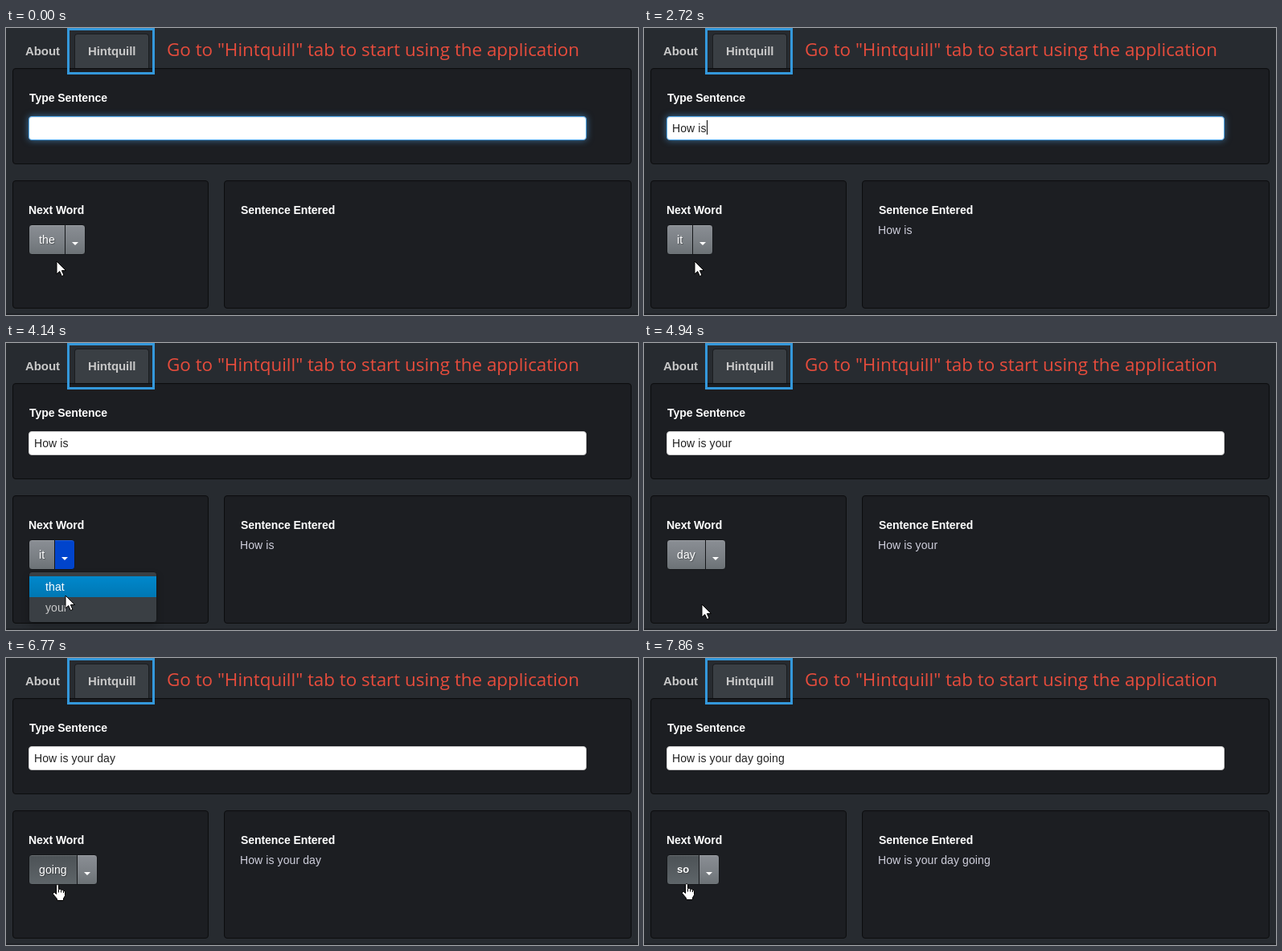
Animation, 786 px wide and 358 px high, one loop 8000 ms. Source, as an HTML page:

```html
<!DOCTYPE html>
<html lang="en">
<head>
<meta charset="utf-8">
<title>Next word prediction</title>
<style>
  html, body { margin: 0; width: 100%; height: 100%; overflow: hidden; background: #272b30; }
  body { position: relative; font: 14px/20px "Liberation Sans", Arial, sans-serif; letter-spacing: .1px; color: #c8c8c8; white-space: pre; }
  body *, svg { position: absolute; box-sizing: border-box; }
  b { color: #fff; letter-spacing: -.07px; }
  .well { background: #1c1e22; border: 1px solid #0c0d0e; border-radius: 4px; box-shadow: inset 0 1px 1px rgba(0,0,0,.05); }
  .tab { font-size: 15px; color: #c8c8c8; top: 19px; }
  #active { left: 85px; top: 7px; width: 93px; height: 43px; background: #3a3f44; border: 1px solid #1a1d20; border-bottom: 0; border-radius: 4px 4px 0 0; }
  #frame { left: 76px; top: 0; width: 109px; height: 58px; border: 3px solid #3498db; }
  #hint { left: 200px; top: 12px; font: 22.4px/30px "Open Sans", sans-serif; letter-spacing: 0; color: #e74c3c; }
  #field { left: 28px; top: 110px; width: 694px; height: 30px; background: #fff; border: 1px solid #ccc; border-radius: 4px; }
  #field.focus { border-color: #52a8ec; box-shadow: inset 0 1px 1px rgba(0,0,0,.08), 0 0 8px rgba(82,168,236,.6); }
  #typed { left: 6px; top: 4px; color: #222; }
  #typed.caret { border-right: 1px solid #000; height: 18px; }
  #entered { left: 291px; top: 242px; color: #cfcfdc; }
  #group { left: 28px; top: 245px; height: 38px; display: flex; }
  #group > * { position: relative; height: 38px; background: linear-gradient(#8a8e94, #7a7f84 60%, #6c7276); border: 1px solid #15171a; box-shadow: inset 0 1px 0 rgba(255,255,255,.15); }
  #word { padding: 8px 12px; color: #fff; border-radius: 4px 0 0 4px; text-shadow: 1px 1px 1px rgba(0,0,0,.3); }
  #toggle { width: 26px; margin-left: -1px; border-radius: 0 4px 4px 0; }
  #toggle::after { content: ""; position: absolute; left: 8px; top: 21px; border: 4px solid transparent; border-top-color: #fff; border-bottom: 0; }
  #group > .hover { background: linear-gradient(#4c5256, #5e6569); }
  #group > .open { background: #04c; }
  #word.heavy { font-weight: bold; font-size: 13px; }
  #menu { left: 28px; top: 285px; width: 160px; height: 64px; background: #3a3f44; border: 1px solid #15171a; border-radius: 4px; box-shadow: 0 5px 10px rgba(0,0,0,.2); }
  #menu div { left: 0; width: 158px; height: 26px; padding: 3px 20px; }
  #menu .hover { color: #fff; background: linear-gradient(#08c, #0077b3); }
  #edge { left: 0; top: 356px; width: 786px; height: 2px; background: #1f2226; }
  svg { left: 0; top: 0; overflow: visible; }
</style>
</head>
<body>
<div class="well" style="left:8px;top:50px;width:770px;height:120px"></div>
<div class="well" style="left:8px;top:190px;width:244px;height:160px"></div>
<div class="well" style="left:271px;top:190px;width:507px;height:160px"></div>
<div id="edge"></div>
<div id="active"></div>
<b class="tab" style="left:24px">About</b>
<b class="tab" style="left:102px">Hintquill</b>
<div id="frame"></div>
<div id="hint">Go to "Hintquill" tab to start using the application</div>
<b style="left:29px;top:77px">Type Sentence</b>
<div id="field"><span id="typed"></span></div>
<b style="left:28px;top:217px">Next Word</b>
<div id="group"><div id="word"></div><div id="toggle"></div></div>
<b style="left:292px;top:217px">Sentence Entered</b>
<div id="entered"></div>
<div id="menu">
  <div id="first" style="top:5px">that</div>
  <div id="second" style="top:31px">your</div>
</div>
<svg width="20" height="24" fill="#fff" stroke="#000">
  <path id="arrow" d="M0 0V16L3.7 12.6 6.4 18.6 9 17.4 6.4 11.6H11.5Z"/>
  <g id="hand">
    <path d="M-1.5 1.5Q0-.5 1.5 1.5V6.5Q3.5 5.5 4.5 7.3 6.5 6.3 7.5 8.3 9.5 8 9.5 10V14.5L7.5 18V20.5H-.5V18.5L-5.5 12.5Q-6 10-3.5 10.5L-1.5 12.5Z"/>
    <path d="M1.5 7V10.5M4.5 7.5V10.5M7.5 8.5V11" fill="none"/>
  </g>
</svg>
<script>
const $ = id => document.getElementById(id);
const LOOP = 8000;

// Each track holds its value until the next time.
const typed = [[0, ""], [740, "H"], [1090, "Ho"], [1500, "How"], [2050, "How "], [2370, "How is"],
  [4540, "How is your"], [5970, "How is your day"], [7200, "How is your day going"]];
const entered = [[0, ""], [1310, "Ho"], [1750, "How"], [2720, "How is"],
  [4740, "How is your"], [6170, "How is your day"], [7410, "How is your day going"]];
const word = [[0, "the"], [1310, "ho"], [1750, "to"], [2720, "it"], [4740, "day"], [6170, "going"], [7610, "so"]];
const pointer = [[0, [63, 291]], [3140, [67, 284]], [3340, [72, 271]], [3940, [74, 292]], [4140, [74, 315]],
  [4340, [72, 326]], [5140, [70, 314]], [5340, [66, 296]], [5550, [64, 282]], [7410, [58, 281]], [7610, [53, 281]]];

const at = (track, t) => track.findLast(([start]) => t >= start)[1];
const during = (t, from, to) => t >= from && t < to;

function draw(now) {
  const t = now % LOOP;
  const [x, y] = at(pointer, t);
  const open = during(t, 3540, 4540);
  const onToggle = during(t, 3340, 3940);
  const onWord = t >= 5550;
  const handy = onToggle || onWord;
  const next = at(word, t);

  $("typed").textContent = at(typed, t);
  $("typed").className = during(t, 740, 2940) ? "caret" : "";
  $("field").className = t < 3540 ? "focus" : "";
  $("entered").textContent = at(entered, t);
  $("word").textContent = next;
  $("word").className = (onWord ? "hover" : "") + (next === "so" ? " heavy" : "");
  $("toggle").className = open ? "open" : onToggle ? "hover" : "";
  $("menu").style.display = open ? "block" : "none";
  $("first").className = during(t, 3940, 4340) ? "hover" : "";
  $("second").className = t >= 4340 ? "hover" : "";
  $("arrow").style.display = handy ? "none" : "inline";
  $("hand").style.display = handy ? "inline" : "none";
  document.querySelector("svg").style.transform = `translate(${x}px, ${y}px)`;
  requestAnimationFrame(draw);
}
draw(0);
</script>
</body>
</html>
```
